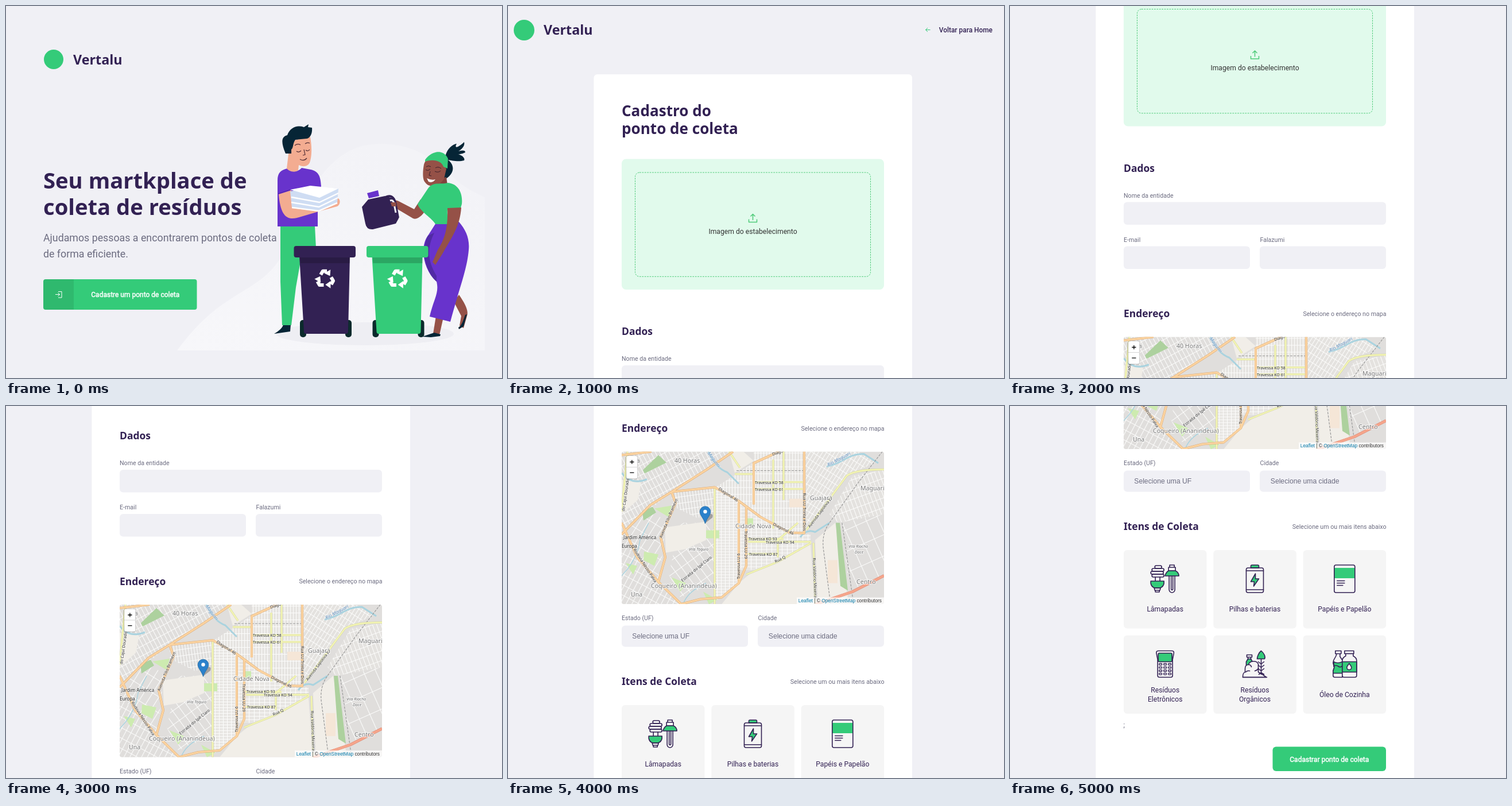
Animation of 864x648 px, one loop 6 s. Source, as an HTML page:

```html
<!DOCTYPE html>
<html lang="pt-BR">
<head>
<meta charset="utf-8">
<title>Ponto de coleta</title>
<style>
  html, body { margin: 0; width: 100%; height: 100%; overflow: hidden; background: #f0f0f5; }
  svg { display: block; }
  text { font: 12.16px Roboto, sans-serif; fill: #6c6c80; white-space: pre; }
  .title { font: 700 17.45px "Noto Sans", sans-serif; fill: #322153; }
  .brand { font-size: 23.3px; }
  .hero { font-size: 38.2px; }
  .h1 { font-size: 26.1px; }
  .lead { font-size: 17.8px; }
  .label { font-size: 10.64px; }
  .nav { font-size: 11.9px; font-weight: 500; fill: #322153; }
  .drop { fill: #333; }
  .select { font-family: "Liberation Sans", sans-serif; }
  .item { fill: #322153; }
  .button { font-size: 12px; fill: #fff; stroke: #fff; stroke-width: .45px; }
  .place, .street, .suburb, .water { font-family: "Noto Sans", sans-serif; paint-order: stroke; stroke: #fffc; stroke-width: 2px; }
  .place { font-size: 10.6px; fill: #777; }
  .street { font-size: 7px; fill: #222; stroke-width: 1px; }
  .town { font-size: 8px; }
  .suburb { font-size: 7px; font-style: italic; fill: #666; }
  .water { font-size: 8.2px; font-style: italic; fill: #4d80b3; stroke-width: 1px; }
  .credit { font: 8.36px "Liberation Sans", sans-serif; fill: #333; }
  .link { fill: #0078a8; }
  .icon { fill: none; stroke: #322153; stroke-width: 1.6; stroke-linejoin: round; stroke-linecap: round; }
  .icon .g { fill: #34cb79; }
  .icon .w { fill: #f5f5f5; }
</style>
</head>
<body>
<svg id="stage" width="864" height="648" viewBox="0 0 864 648">
  <defs>
    <linearGradient id="glow" x1="0" y1="1" x2=".6" y2="0">
      <stop offset="0" stop-color="#f7f7fa"/><stop offset="1" stop-color="#f3f3f7"/>
    </linearGradient>
    <g id="recycle" fill="#fff">
      <g id="turn">
        <path d="M-7.2-6.9L-3.8-12.8H2.8" fill="none" stroke="#fff" stroke-width="5.6" stroke-linejoin="round"/>
        <path d="M8.6-15L-1.6-9.2 7.8-4.8Z"/>
      </g>
      <use href="#turn" transform="rotate(120)"/>
      <use href="#turn" transform="rotate(240)"/>
    </g>
    <g id="bin">
      <rect x="512" y="547" width="11" height="30" rx="5" fill="#0b2a2c"/>
      <rect x="591" y="547" width="11" height="30" rx="5" fill="#0b2a2c"/>
      <path d="M511 436H599L596 567Q596 571 592 571H523Q519 571 519 567Z"/>
      <path d="M512 438H599V448H513Z" fill="#000" opacity=".18"/>
      <rect x="501.5" y="418" width="107.5" height="20" rx="4"/>
      <use href="#recycle" transform="translate(556 475.5) scale(1.08)"/>
    </g>
    <clipPath id="mapFrame"><rect x="198" y="346" width="457" height="265.5" rx="4"/></clipPath>
  </defs>

  <g id="landing">
    <path d="M298 600C350 530 385 515 430 486C505 440 495 370 540 308C575 257 610 241 650 240C715 240 745 268 783 302Q800 318 834 333V600Z" fill="url(#glow)"/>
    <ellipse cx="625" cy="571" rx="155" ry="20" fill="#eeeef3"/>
    <circle cx="83" cy="93" r="17" fill="#34cb79"/>
    <rect x="65" y="476" width="267.5" height="53" rx="4" fill="#34cb79"/>
    <path d="M69 476H118V529H69Q65 529 65 525V480Q65 476 69 476Z" opacity=".09"/>
    <path d="M91 497.5H97V508H91M86 502.5H93.5M90.5 499.5L93.5 502.5 90.5 505.5" fill="none" stroke="#fff"/>

    <g id="man">
      <path d="M467 571C475 566 481 562 483 555H496L495 567Z" fill="#062536"/>
      <path d="M478 383H538L540 422H517L505 490 497 556H481L478 480Z" fill="#34cb79"/>
      <path d="M490 283C478 286 473 291 473 304V384H543V330L549 314C548 294 543 288 531 285L515 282C508 290 495 290 490 283Z" fill="#6833cc"/>
      <path d="M496 245C498 238 502 233 506 233L530 228C533 245 533 262 529 273C524 282 514 279 510 277L509 286C503 291 493 288 489 283L492 258Z" fill="#f3ac91"/>
      <path d="M487 257C480 240 478 228 490 225C495 211 508 207 519 211L527 206 526 211 533 212C534 222 530 230 524 231L504 233C499 240 501 247 497 250V257Z" fill="#062536"/>
      <path d="M503 243Q508 239 513 242M521 240Q525 237 529 239M506 253Q510 256 514 252M522 251Q526 254 529 250M519 250L521 259 517 260M512 267Q519 271 524 265" fill="none" stroke="#543037" stroke-width="1.2"/>
      <path d="M475 328L497 321C499 335 500 345 507 349L548 350 574 336C583 331 584 346 577 349L548 357 507 369C487 374 478 362 475 328Z" fill="#f3ac91"/>
      <path d="M495 323L530 314 579 318 577 344 545 358 498 352Z" fill="#cfddf3"/>
      <path d="M495 320L530 313 579 318 546 334Z" fill="#fff"/>
      <path d="M497 333L546 342 579 326M497 342L545 350 578 334M498 351L545 357 577 343" fill="none" stroke="#fff" stroke-width="2.5"/>
      <path d="M474 327L495 320" stroke="#4e22a0"/>
    </g>

    <g id="woman">
      <path d="M780 515L789 503C801 520 806 532 803 540L797 561 790 557 793 540Z" fill="#955147"/>
      <path d="M803 537L797 558 789 563 788 560C794 557 797 546 800 538Z" fill="#062536"/>
      <path d="M749 540L762 542 755 573 744 571Z" fill="#955147"/>
      <path d="M725 576L746 569 757 572 756 575 740 577Z" fill="#062536"/>
      <path d="M749 378L789 376C801 390 808 405 806 425C803 460 790 490 774 550L738 541C745 510 755 500 750 480C727 460 720 420 735 400Z" fill="#6833cc"/>
      <path d="M746 395C734 420 733 442 750 470V480C730 463 722 425 735 400Z" fill="#512aa5"/>
      <path d="M765 264C767 248 780 240 785 240C781 247 785 249 798 237C800 244 793 250 788 253C796 251 800 251 800 255Q793 259 787 258C795 260 800 265 798 269C788 272 776 269 770 268C785 280 778 295 764 302L752 256Z" fill="#062536"/>
      <path d="M750 302L767 298 770 318H750Z" fill="#80433d"/>
      <path d="M728 276C731 265 743 261 760 268L767 284 763 301C754 316 736 317 730 307C725 302 726 287 728 276Z" fill="#955147"/>
      <path d="M730 268C742 251 763 249 770 266L769 283 762 280C759 270 745 266 730 271Z" fill="#34cb79"/>
      <path d="M731 285Q735 288 739 284M747 288Q753 291 757 287M732 280Q736 277 740 280M748 282Q753 279 758 283M739 288L737 295 741 296" fill="none" stroke="#3b202a"/>
      <path d="M733 300Q741 304 748 302Q743 309 736 306Z" fill="#fff"/>
      <path d="M722 337L711 354 684 340C673 335 667 343 672 348L709 370C717 374 728 362 733 352Z" fill="#955147"/>
      <path d="M735 318C745 305 755 312 770 308C788 310 796 326 794 345L791 355 769 355C768 368 772 376 771 380H748C743 370 721 358 717 345Z" fill="#34cb79"/>
      <path d="M769 352L793 351C791 385 775 405 760 432L748 451 743 446 752 425C765 405 770 385 769 352Z" fill="#955147"/>
    </g>

    <g id="jug">
      <path d="M629 326L648 321 650 331 632 335Z" fill="#6833cc"/>
      <path d="M620 350L631 337 660 331 677 336 684 370 679 379 639 389Q628 390 626 379Z" fill="#322153"/>
      <path d="M661 333Q674 327 678 342L683 369" fill="none" stroke="#322153" stroke-width="4"/>
      <path d="M669 339Q675 337 676 345L679 360" fill="none" stroke="#f3f3f7" stroke-width="3"/>
      <path d="M670 342L679 342 680 349 672 349Z" fill="#955147"/>
    </g>
    <use href="#bin" fill="#322153"/>
    <use href="#bin" x="126.5" fill="#34cb79"/>
  </g>

  <g id="form">
    <circle cx="28" cy="42" r="18" fill="#34cb79"/>
    <path d="M735.5 41.5H727.5M731 38L727.5 41.5 731 45" fill="none" stroke="#34cb79"/>
    <rect x="149.5" y="119" width="554.5" height="1700" rx="6" fill="#fff"/>
    <rect x="198" y="266.5" width="457" height="227.5" rx="7.6" fill="#e1faec"/>
    <rect x="221.5" y="290" width="410" height="181.3" rx="7.6" fill="none" stroke="#4ecb79" stroke-dasharray="2.7 1.7"/>
    <path d="M419.5 371.5V376.5H433.5V371.5M426.5 373V363M422.5 366.5L426.5 362.5 430.5 366.5" fill="none" stroke="#4ecb79" stroke-width="1.5" stroke-linejoin="round"/>
    <rect x="457.5" y="1645" width="197.5" height="42.5" rx="6" fill="#34cb79"/>
  </g>
</svg>

<script>
const landing = document.getElementById('landing');
const form = document.getElementById('form');
const add = (parent, markup) => parent.insertAdjacentHTML('beforeend', markup);

const text = (x, y, words, style, anchor = 'start') =>
  `<text x="${x}" y="${y}" class="${style}" text-anchor="${anchor}">${words}</text>`;
const tilted = (x, y, angle, words, style = 'street') =>
  `<g transform="translate(${x} ${y}) rotate(${angle})">${text(0, 0, words, style)}</g>`;
const field = (x, y, width, height) =>
  `<rect x="${x}" y="${y}" width="${width}" height="${height}" rx="6" fill="#f0f0f5"/>`;
const shape = (d, fill) => `<path d="${d}" fill="${fill}"/>`;
const line = (d, color, width, extra = '') =>
  `<path d="${d}" fill="none" stroke="${color}" stroke-width="${width}" stroke-linejoin="round" ${extra}/>`;
const road = (d, fill, edge, width) => line(d, edge, width + 1) + line(d, fill, width);

// A block of side streets: a tilted grid of pale lines cut to an outline.
let gridCount = 0;
function streets(d, angle, w, h, ground) {
  const id = 'grid' + gridCount++;
  return `<pattern id="${id}" width="${w}" height="${h}" patternUnits="userSpaceOnUse" patternTransform="rotate(${angle})">
    <rect width="${w}" height="${h}" fill="${ground}"/>
    <path d="M0 0H${w}M0 0V${h}" stroke="#fcfcfb" stroke-width="2.2"/></pattern>` + shape(d, `url(#${id})`);
}

function map() {
  const land = '#f1eee8', town = '#e0dedc', wood = '#add19e', grass = '#cdebb0', river = '#aad3df';
  const ground =
    shape('M198 346H655V612H198Z', town) +
    streets('M198 346H392L345 378 285 416 198 488Z', -28, 7, 15, town) +
    streets('M285 416L360 408V450L330 462 285 440Z', -8, 5, 11, town) +
    streets('M198 490L250 445 275 470 268 530 262 573 198 505Z', 32, 13, 24, town) +
    streets('M198 505L262 573 300 612H198Z', 28, 9, 16, town) +
    streets('M300 470H360V575L300 600 280 560Z', -36, 13, 20, town) +
    streets('M362 408L402 432V575L362 606Z', 0, 7, 5, '#e8e6e3') +
    streets('M362 408L428 365V346H516V488H490L402 435Z', 0, 5, 12, '#e6e4e1') +
    streets('M402 435L490 490H527V507L430 552H402Z', 0, 9, 6, '#e8e6e3') +
    streets('M518 346H610L640 365 590 388 520 482Z', 32, 6, 13, '#e4e2df') +
    streets('M600 388L655 378V455L575 470 560 455Z', -20, 7, 16, '#e4e2df') +
    streets('M582 470L655 455V562L594 588Z', -24, 20, 34, town) +
    shape('M430 552L527 507 534 612H372L402 575Z', land) +
    shape('M535 500L570 470 592 600 540 612Z', land) +
    shape('M273 478L345 468V500L308 516 275 522Z', land) +
    shape('M385 346L410 346 428 362 395 383Z', land) +
    shape('M198 395L232 400 226 430 198 455Z', land) +
    shape('M490 428H515V443H490ZM557 535H574V575H557Z', '#f5e6d7') +
    shape('M235 378L262 352 276 365 238 384ZM234 450L252 442 258 452 236 466ZM571 470H578L592 588 579 580Z', wood) +
    shape('M255 445L285 440 280 460ZM345 483H368V497H345ZM415 462H427V475H415ZM237 520L262 525 255 545 236 535ZM205 540L225 545 218 560ZM285 565L310 575 300 590ZM340 590L365 604 350 612Z', grass);
  const water =
    line('M349 346Q362 375 382 382L402 402M555 372C585 366 590 350 620 350L645 366M198 383Q215 405 242 394M509 495Q520 480 535 486L560 470', river, 3) +
    line('M198 562Q225 535 230 500L245 470M305 612Q312 590 345 575', river, 1.5);
  const rail =
    line('M398 379H516M652 346L610 400 560 470Q545 490 550 520L562 612M582 470L602 612', '#999', 1.2, 'stroke-dasharray="4 2"');
  const minor =
    'M198 450L208 346M360 408V612M428 399H516M428 411H516M462 360V480M480 345V430M415 498H480M418 503H528M418 524H470M415 560L470 538 528 505M532 505L535 612M520 482L590 388Q605 377 655 377M385 346L404 374M395 385H428M505 470L470 500V530';
  const major =
    'M198 490L248 439 285 416 345 378 392 346M285 416L360 408 402 432 440 460 490 487 516 488V346M428 438V366L472 346M402 435V575L372 600 335 603 300 612M415 440V545L402 575M285 416L292 436 266 495 274 530 262 573M198 470L225 530 262 573 302 612M250 346L198 352';
  const roads =
    road(minor, '#f4f6b4', '#cfd09a', 2.4) + road(major, '#fbd3a0', '#dba974', 3.2) +
    road('M535 612L600 590 655 562', '#f5a58b', '#d78371', 4);
  const labels =
    [[212, 365, 'nca'], [290, 365, '40 Horas'], [526, 430, 'Guajará'], [614, 413, 'Maguari'], [396, 479, 'Cidade Nova'],
     [249, 583, 'Coqueiro (Ananindeua)'], [214, 598, 'Una'], [607, 576, 'Centro']].map(p => text(...p, 'place')).join('') +
    [[201, 498, 'Jardim América'], [198, 513, 'Europa']].map(p => text(...p, 'street town')).join('') +
    [[430, 402, 'Travessa KO 58'], [430, 414, 'Travessa KO 61'], [419, 500, 'Travessa KO 93'],
     [449, 506, 'Travessa KO 94'], [420, 527, 'Travessa KO 87']].map(p => text(...p, 'street')).join('') +
    [[315, 518, 'Vila Tóquio'], [593, 513, 'Vila Riacho'], [604, 523, 'Doce']].map(p => text(...p, 'suburb')).join('') +
    [[366, 412, 33, 'Diagonal 46'], [461, 474, 26, 'Diagonal 46'], [461, 353, -17, 'Diago'],
     [268, 497, -68, 'Avenida Tílio Bramexo'], [218, 517, 57, 'Rodovia Néstio Palva'],
     [304, 573, -39, 'Estrada do Ipê Claro'], [404, 568, -90, 'Travessa LU 6'], [412, 484, 90, 'Travessa LU 29'],
     [514, 418, 90, 'Rua LU Trinta e Dois'], [526, 479, -53, 'Avenida Sapotiva I'],
     [531, 531, 88, 'Rua Valdório Mexeiras'], [466, 540, -26, 'Rua Q'], [203, 450, -82, 'do Cajuí Dourado']]
      .map(p => tilted(...p)).join('') +
    tilted(558, 372, -28, 'Rio Maguari', 'water') + tilted(347, 349, 53, 'Maguari', 'water');
  const controls =
    `<rect x="205" y="353" width="21" height="41" rx="4" fill="#0004"/>
    <rect x="206" y="353.5" width="19.5" height="39.5" rx="3" fill="#fff"/>
    <path d="M206 373H225.5" stroke="#ccc" stroke-width=".8"/>
    <path d="M212.3 364H219.5M215.9 360.4V367.6M212.3 382.7H219.5" stroke="#000" stroke-width="1.3"/>
    <path d="M343 471L350 455Q359 453 356 461Z" opacity=".28"/>
    <path d="M343.5 471.5C341 462 334 457 334.2 450.5A9.3 9.3 0 0 1 352.8 450.5C353 457 346 462 343.5 471.5Z" fill="#2a81cb" stroke="#246aa0" stroke-width=".8"/>
    <circle cx="343.5" cy="450.5" r="3.2" fill="#fff"/>
    <rect x="503" y="600" width="152" height="12" fill="#fffb"/>` +
    text(651, 608.5, '<tspan class="link">Leaflet</tspan> | © <tspan class="link">OpenStreetMap</tspan> contributors', 'credit', 'end');
  return `<g transform="translate(0 515)" clip-path="url(#mapFrame)">${ground}${water}${rail}${roads}${labels}${controls}</g>`;
}

const keys = [0, 1, 2, 3].flatMap(row => [0, 1, 2].map(col =>
  `<rect x="${-10.5 + col * 8}" y="${-1 + row * 5.6}" width="5" height="2.8" rx="1"/>`)).join('');

const items = [
  [['Lâmapadas'], `
    <rect x="-18" y="-23" width="12" height="5" rx="2.5"/><rect x="-23" y="-18" width="21" height="5" rx="2.5"/>
    <rect x="-25" y="-13" width="22" height="5" rx="2.5"/><rect x="-23" y="-8" width="21" height="5" rx="2.5"/>
    <path d="M-17-3V4M-9-3V4"/><path class="g" d="M-25 4H-2V8Q-3 14-9 16H-18Q-24 14-25 8Z"/>
    <path d="M-19 16H-8L-9 20H-18ZM-17 20H-10V23H-17Z"/>
    <path d="M8-24H16V-20H8ZM6-20H18V-14H6Z"/><path class="g" d="M6-14H18Q24-11 24-5H0Q1-11 6-14Z"/>
    <path d="M7-5V19A5 5 0 0 0 17 19V-5M10.5-5V18A1.5 1.5 0 0 0 13.5 18V-5"/>`],
  [['Pilhas e baterias'], `
    <path class="g" d="M-7-19V-22Q-7-24-5-24H5Q7-24 7-22V-19Z"/><rect x="-15" y="-19" width="30" height="43" rx="3"/>
    <path d="M-15-14H15M-15 19H15"/><path class="g" d="M1-9L-7 5H-1L-2 13 7 0H1Z"/>`],
  [['Papéis e Papelão'], `
    <path class="g" stroke="none" d="M-18-19H18V-1H-18Z"/><rect x="-18" y="-24" width="36" height="48" rx="3"/>
    <path d="M-13 3.5H0M-13 7.5H0M-13 11.5H-3"/>`],
  [['Resíduos', 'Eletrônicos'], `
    <path d="M-12-23H12Q16-23 15-18L13-8V20Q13 23 10 23H-10Q-13 23-13 20V-8L-15-18Q-16-23-12-23Z"/>
    <rect class="g" x="-12" y="-19" width="24" height="15" rx="2"/><g stroke-width="1.3">${keys}</g>`],
  [['Resíduos', 'Orgânicos'], `
    <path class="g" d="M-15 4V-4L-12-9H-7L-4-4V4Z"/><path d="M-14-16H-5V-12H-14ZM-12-12V-8M-7-12V-8"/>
    <path class="w" d="M-21 23C-21 17-20 15-17 14V8C-17 3-14 1-11 1C-9-6 3-7 6 0V14L13 18 20 23Z"/>
    <path d="M-11 1Q-7 1-6 5M-16 14Q-13 11-9 12M0 12Q4 11 6 8"/>
    <path class="g" d="M11-23C16-19 19-13 17-9H4C4-13 7-20 11-23Z"/>
    <path d="M11-9V18M6-4L11 0 16-4M6 2L11 6 16 2M6 8L11 12 16 8M7 18L11 15 16 18M-21 23H21"/>`],
  [['Óleo de Cozinha'], `
    <path d="M-16-23H-6V-18H-16ZM-14-18C-14-11-20-10-20-2L-18 6-20 12V20Q-20 23-17 23H-4V-7L-8-13V-18Z"/>
    <path class="g" d="M-19-4Q-12 0-4-4V16H-20V12L-18 6Z"/><path d="M-19 4Q-15 1-11 4T-4 3"/>
    <path d="M0-23H16V-18H0Z"/><path class="w" d="M2-18V-14Q-4-11-4-6V20Q-4 23-1 23H18Q21 23 21 20V-6Q21-11 15-14V-18Z"/>
    <path class="g" d="M-4-4H21V14H-4Z"/><path class="w" d="M8-1C5 3 4 4 4 6A4 4 0 0 0 12 6C12 4 11 3 8-1Z"/>`],
];

function itemCard([lines, icon], index) {
  const row = Math.floor(index / 3), x = 198 + index % 3 * 156.3, y = 1302.5 + row * 148.5, middle = x + 72.2;
  const baseline = row ? y + 107.5 - (lines.length - 1) * 7.6 : y + 107;
  return `<rect x="${x}" y="${y}" width="144.5" height="136.5" rx="6" fill="#f5f5f5"/>
    <g class="icon" transform="translate(${middle} ${y + 50})">${icon}</g>` +
    lines.map((words, i) => text(middle, baseline + i * 15.2, words, 'item', 'middle')).join('');
}

add(landing,
  text(117, 101.5, 'Vertalu', 'title brand') +
  text(65, 317.5, 'Seu martkplace de', 'title hero') +
  text(65, 364, 'coleta de resíduos', 'title hero') +
  text(65, 409.5, 'Ajudamos pessoas a encontrarem pontos de coleta', 'lead') +
  text(65, 437.5, 'de forma eficiente.', 'lead') +
  text(225.3, 506.8, 'Cadastre um ponto de coleta', 'button', 'middle'));

add(form,
  text(62, 50, 'Vertalu', 'title brand') +
  text(844, 45.7, 'Voltar para Home', 'nav', 'end') +
  text(198, 192, 'Cadastro do', 'title h1') +
  text(198, 223, 'ponto de coleta', 'title h1') +
  text(426.5, 396.5, 'Imagem do estabelecimento', 'drop', 'middle') +
  text(198, 573, 'Dados', 'title') +
  text(198, 618, 'Nome da entidade', 'label') + field(198, 626, 457, 39.5) +
  text(198, 695, 'E-mail', 'label') + field(198, 703, 220, 39.5) +
  text(435.5, 695, 'Falazumi', 'label') + field(435, 703, 220, 39.5) +
  text(198, 826.5, 'Endereço', 'title') +
  text(655.5, 824, 'Selecione o endereço no mapa', 'label', 'end') +
  map() +
  text(198, 1154.5, 'Estado (UF)', 'label') + field(198, 1164, 220, 37) +
  text(435.5, 1154.5, 'Cidade', 'label') + field(435, 1164, 220, 37) +
  text(216.3, 1186.7, 'Selecione uma UF', 'select') +
  text(453.8, 1186.7, 'Selecione uma cidade', 'select') +
  text(198, 1267.5, 'Itens de Coleta', 'title') +
  text(655.5, 1265, 'Selecione um ou mais itens abaixo', 'label', 'end') +
  items.map(itemCard).join('') +
  text(197.5, 1611, ';', '') +
  text(556.3, 1671.5, 'Cadastrar ponto de coleta', 'button', 'middle'));

// The landing page shows for one second, then the form jumps through its scroll stops.
const scrollStops = [0, 284.5, 515, 781.5, 1051.5];
function draw() {
  const second = Math.floor(performance.now() / 1000) % 6;
  landing.style.display = second ? 'none' : '';
  form.style.display = second ? '' : 'none';
  if (second) form.setAttribute('transform', `translate(0 ${-scrollStops[second - 1]})`);
  requestAnimationFrame(draw);
}
draw();
</script>
</body>
</html>
```
